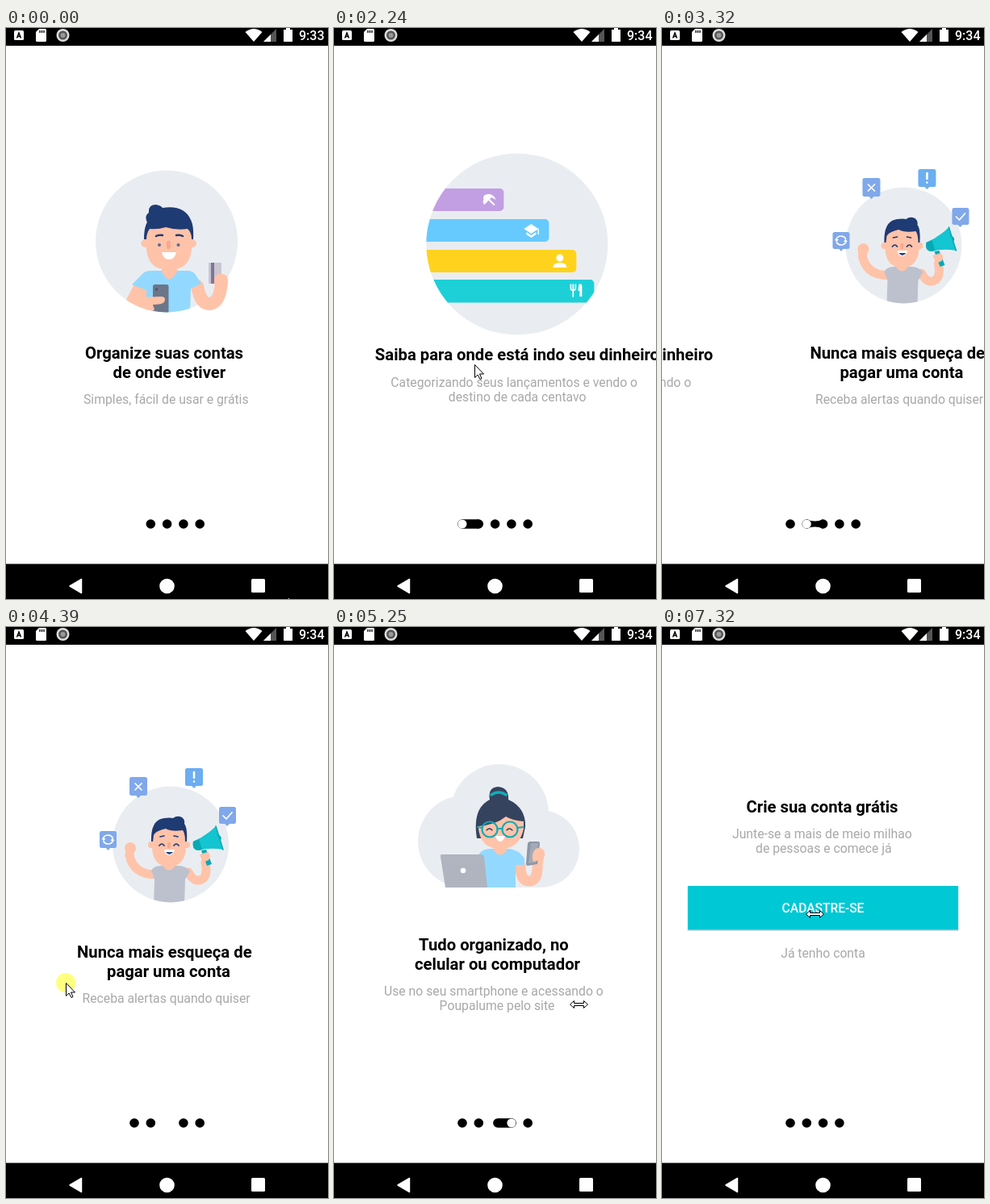
An HTML page that plays this animation: 399x708 px, repeating every 8000 ms.

```html
<!DOCTYPE html>
<html lang="pt-BR">
<head>
<meta charset="utf-8">
<title>Onboarding</title>
<style>
  html, body { margin: 0; width: 100%; height: 100%; overflow: hidden; background: #fff; }
  svg { display: block; width: 399px; height: 708px; }
  text { font-family: Roboto, sans-serif; }
  .title { font-size: 20.25px; font-weight: 700; fill: #000; }
  .sub { font-size: 15.75px; fill: #a8a8a8; }
  .label { font-size: 15.6px; font-weight: 500; fill: #fff; }
  .skin { fill: #ffc3a9; }
  .arm { fill: none; stroke: #ffc3a9; stroke-linecap: round; stroke-linejoin: round; }
  .pale { fill: #e9edf2; }
  .navy { fill: #1f3b73; }
  .shirt { fill: #93d9ff; }
  .line { fill: none; stroke-linecap: round; stroke-linejoin: round; }
</style>
</head>
<body>
<svg viewBox="0 0 399 708">
  <defs>
    <clipPath id="disc0"><path d="M100 150H300V264.500H287A88 88 0 0 1 111 264.500H100Z"/></clipPath>
    <clipPath id="disc1"><circle cx="200.500" cy="268" r="112.500"/></clipPath>
    <clipPath id="disc2"><path d="M100 150H300V269.500H276A72 72 0 0 1 132 269.500H100Z"/></clipPath>
  </defs>

  <!-- boy with card -->
  <g class="page">
    <circle class="pale" cx="199" cy="264.500" r="88"/>
    <path class="arm" stroke-width="16" d="M237 320Q241 342 252 342Q265 341 267 315"/>
    <g clip-path="url(#disc0)">
      <path class="skin" d="M160 316L174 320 176 333 196 334Q199 342 194 348L176 354H140Z"/>
      <path class="shirt" d="M170 304Q173 301 180 301H224Q232 301 235 306L242 317 229 323 228 356H174V325L156 318Z"/>
      <path class="skin" d="M193 292H212V302Q202 321 193 302Z"/>
      <rect x="182" y="318" width="19.500" height="40" rx="2.500" fill="#6c7689"/>
      <circle cx="186.500" cy="324" r="1.800" fill="#4b556b"/>
      <path class="skin" d="M146 340L164 334 193 333Q199 334 196 340Q193 343 182 343L184 349 176 356H140Z"/>
    </g>
    <rect x="251" y="291" width="16" height="26" fill="#c9c6d2"/>
    <rect x="254" y="291" width="4" height="26" fill="#81749c"/>
    <rect class="skin" x="258" y="305" width="17" height="17" rx="7"/>
    <circle class="skin" cx="172.500" cy="267" r="5"/><circle class="skin" cx="231" cy="267" r="5"/>
    <path class="skin" d="M174 238H230V274Q228 300 202 300Q176 300 174 274Z"/>
    <path class="navy" d="M171 262Q171 247 175 241Q171 233 177 229Q176 219 186 219Q192 220 194 223Q221 219 229 238Q233 246 232 262H230Q230 253 225 249Q211 251 198 247Q188 250 178 249Q174 254 174 262Z"/>
    <path class="line" stroke="#1f3b73" stroke-width="2.500" d="M186 258Q189 256 194 257M211 257Q216 256 219 258"/>
    <circle cx="190" cy="269" r="2" fill="#556d96"/><circle cx="213.500" cy="269" r="2" fill="#556d96"/>
    <path d="M199 265Q202 262 204 265V272Q201 277 199 272Z" fill="#f7a98f"/>
    <path d="M193 278H211Q209 287 202 287Q195 287 193 278Z" fill="#fff"/>
    <text class="title" x="98" y="410">Organize suas contas</text>
    <text class="title" x="132.500" y="434">de onde estiver</text>
    <text class="sub" x="96" y="466">Simples, fácil de usar e grátis</text>
  </g>

  <!-- category bars -->
  <g class="page">
    <circle class="pale" cx="200.500" cy="268" r="112.500"/>
    <g clip-path="url(#disc1)">
      <rect x="60" y="199" width="124" height="28" rx="5" fill="#c29ee3"/>
      <rect x="60" y="237" width="180" height="28" rx="5" fill="#66caff"/>
      <rect x="60" y="275" width="214" height="28" rx="5" fill="#ffd31d"/>
      <rect x="60" y="312" width="236" height="28.500" rx="5" fill="#1dd0d8"/>
    </g>
    <g fill="#fff">
      <path d="M159 213Q157 205 167 206Q173 208 174 213L169 210 160 219Q157 216 159 213Z"/>
      <path class="line" stroke="#fff" stroke-width="2" d="M165 212L172 219"/>
      <path d="M218 243L227 249 218 255 209 249ZM212 253L218 257 224 253V256L218 260 212 256ZM226 249H227.500V256H226Z"/>
      <circle cx="253.500" cy="285" r="4.500"/><path d="M245 297Q245 291 253.500 291Q262 291 262 297Z"/>
      <path d="M277 318Q281 316 281 320V333H278V326H276Z"/>
    </g>
    <path class="line" stroke="#fff" stroke-width="1.700" d="M267 318V323Q267 325 270 325Q273 325 273 323V318M270 318V333"/>
    <text class="title" x="24.500" y="412">Saiba para onde está indo seu dinheiro</text>
    <text class="sub" x="44" y="444.500">Categorizando seus lançamentos e vendo o</text>
    <text class="sub" x="115.500" y="463">destino de cada centavo</text>
  </g>

  <!-- boy with megaphone -->
  <g class="page">
    <circle class="pale" cx="204" cy="269.500" r="72"/>
    <g clip-path="url(#disc2)">
      <path class="arm" stroke-width="11" d="M186 307Q158 307 153 283L154 274M226 304Q234 319 244 312Q250 307 247 292"/>
      <path d="M180 302Q183 296 192 296H214Q223 296 228 303L222 313 221 345H183L184 313Z" fill="#bdc1cd"/>
    </g>
    <circle class="skin" cx="154" cy="274" r="7"/>
    <path class="skin" d="M195 290H209V297Q202 306 195 297Z"/>
    <circle class="skin" cx="180" cy="270" r="4"/><circle class="skin" cx="224" cy="270" r="4"/>
    <path class="skin" d="M181 249H223V275Q221 297 202 297Q183 297 181 275Z"/>
    <path class="navy" d="M180 266Q179 239 196 237Q203 236 207 237Q212 233 218 236Q222 239 221 244Q225 249 224 266H222Q222 256 219 252Q205 254 198 250Q185 253 183 258L182 266Z"/>
    <path class="line" stroke="#1f3b73" stroke-width="1.700" d="M191 260L196 259M208 259L213 260M190 271Q193 267 196 271M208 271Q211 267 214 271"/>
    <path d="M200 267H204V273Q202 276 200 273Z" fill="#f7a98f"/>
    <path d="M196 276H209Q207 283 202 283Q197 283 196 276Z" fill="#fff"/>
    <path d="M198 279H207Q202 285 198 279Z" fill="#234178"/>
    <path d="M232 266Q248 259 260 247L269 276Q253 273 238 277Q230 276 232 266Z" fill="#13c5d0"/>
    <path d="M232 266L239 263 243 276 238 277Q230 276 232 266M242 277L248 276 255 294 249 296Z" fill="#08a9b5"/>
    <path class="line" stroke="#08a9b5" stroke-width="1.500" d="M260 247L269 276M262 258Q268 260 265 265"/>
    <path class="skin" d="M240 282L250 279Q255 283 251 289L244 292Z"/>
    <g fill="#80a8ea">
      <path d="M118.500 253H134.500Q137 253 137 255.500V271.500Q137 274 134.500 274H129L126.500 277 124 274H118.500Q116 274 116 271.500V255.500Q116 253 118.500 253Z"/>
      <path d="M155.500 186H172.500Q175 186 175 188.500V206.500Q175 209 172.500 209H167L164 212 161 209H155.500Q153 209 153 206.500V188.500Q153 186 155.500 186Z"/>
      <path d="M224.500 175H241.500Q244 175 244 177.500V194.500Q244 197 241.500 197H236L233 200 230 197H224.500Q222 197 222 194.500V177.500Q222 175 224.500 175Z" fill="#6caef0"/>
      <path d="M266.500 223H282.500Q285 223 285 225.500V241.500Q285 244 282.500 244H277L274 247 271 244H266.500Q264 244 264 241.500V225.500Q264 223 266.500 223Z"/>
    </g>
    <path class="line" stroke="#fff" stroke-width="1.700" d="M160 194L168 202M168 194L160 202M269 234L273 238 280 230M120.500 262Q122 258 126.500 258Q130 258 132 261M132.500 265Q131 269 126.500 269Q123 269 121 266"/>
    <path d="M118.500 262H123.500L121 265.500ZM129.500 265H134.500L132 261.500Z" fill="#fff"/>
    <path class="line" stroke="#fff" stroke-width="2.600" d="M233 180V187M233 191.500V191.600"/>
    <text class="title" x="88" y="410">Nunca mais esqueça de</text>
    <text class="title" x="125" y="434">pagar uma conta</text>
    <text class="sub" x="94.500" y="466">Receba alertas quando quiser</text>
  </g>

  <!-- girl with laptop -->
  <g class="page">
    <g class="pale">
      <circle cx="161" cy="266" r="57"/><circle cx="205" cy="231" r="61"/>
      <circle cx="256" cy="275" r="48"/><rect x="161" y="250" width="95" height="73"/>
    </g>
    <path d="M177 262Q171 225 193 214Q190 199 203 198Q217 199 216 214Q238 224 237 248L234 262Z" fill="#36435f"/>
    <path class="line" stroke="#12aeb7" stroke-width="3.500" d="M195 208Q204 202 213 208"/>
    <path class="arm" stroke-width="13" d="M231 296Q231 315 242 315Q253 315 252 294L254 283"/>
    <path class="shirt" d="M180 281Q184 275 194 275H217Q229 276 236 287V295H225V323H180Z"/>
    <path class="skin" d="M198 263H214V277Q206 288 198 277Z"/>
    <path class="skin" d="M179 247Q201 245 213 235Q221 240 235 241V250Q230 275 206 275Q182 275 179 250Z"/>
    <g class="line" stroke="#13aab4" stroke-width="2.200">
      <circle cx="193" cy="251" r="9.500"/><circle cx="218" cy="251" r="9.500"/>
      <path d="M202.500 250H208.500M178 248L184 249M227 249L235 248"/>
    </g>
    <path class="line" stroke="#35425e" stroke-width="1.300" d="M189 252Q193 248 196 252M214 252Q217 248 221 252"/>
    <path d="M200 259H212Q210 266 206 266Q202 266 200 259Z" fill="#fff"/>
    <path d="M134 282H182Q185 282 186 285L190 323H138L132 285Q131 282 134 282Z" fill="#afb4bf"/>
    <circle cx="160" cy="302" r="3.300" fill="#fff"/>
    <path d="M242 266H253Q255 266 255 269L252 294 240 296Q238 296 238 293L240 268Z" fill="#8d96a6"/>
    <path d="M244 268H253L250 292 241 293Z" fill="#a3aab7"/>
    <path class="skin" d="M248 277Q252 272 258 275Q264 280 259 288L247 291Q244 284 248 277Z"/>
    <text class="title" x="105" y="400.500">Tudo organizado, no</text>
    <text class="title" x="100" y="424.500">celular ou computador</text>
    <text class="sub" x="62" y="456.500">Use no seu smartphone e acessando o</text>
    <text class="sub" x="202" y="475" text-anchor="middle">Poupalume pelo site</text>
  </g>

  <!-- sign up -->
  <g class="page">
    <text class="title" x="104.500" y="230">Crie sua conta grátis</text>
    <text class="sub" x="87" y="262">Junte-se a mais de meio milhao</text>
    <text class="sub" x="116" y="280">de pessoas e comece já</text>
    <rect x="31.500" y="322" width="336" height="55" fill="#dcdcdc"/>
    <rect x="32" y="321" width="335" height="54.500" fill="#00c8d5"/>
    <text class="label" x="199.500" y="354" text-anchor="middle">CADASTRE-SE</text>
    <text class="sub" x="199.500" y="410" text-anchor="middle">Já tenho conta</text>
  </g>

  <g id="dots"></g>

  <!-- status and navigation bars -->
  <path d="M0 0H399V22H0ZM0 664.500H399V708H0Z"/>
  <g fill="#fff">
    <rect x="10" y="3" width="12" height="12" rx="1.500"/>
    <path d="M13.500 12.500L16 6 18.500 12.500M14.500 10.500H17.500" fill="none" stroke="#000" stroke-width="1.500"/>
    <path d="M41 1H48.500Q50 1 50 2.500V15.500Q50 17 48.500 17H38.500Q37 17 37 15.500V5Z"/>
    <path d="M42 3V6M44.500 3V6M47 3V6" stroke="#000" stroke-width="1.300"/>
    <circle cx="70.500" cy="9" r="8" fill="#ddd"/><circle cx="70.500" cy="9" r="5.500" fill="#555"/><circle cx="70.500" cy="9" r="3" fill="#999"/>
    <path d="M296.500 5Q307-3 317.500 5L307 17Z"/>
    <path d="M335 1V17H319Z" fill="#555"/><path d="M328 8V17H319Z"/>
    <path d="M344 2H347V0H352V2H355V17H344Z"/>
    <text id="clock" x="363" y="14.500" font-size="16" font-weight="500"></text>
    <path d="M79 692L93.500 683.500V700.500Z" stroke="#fff" stroke-width="1.500" stroke-linejoin="round"/>
    <circle cx="199.500" cy="692" r="9.300"/><rect x="304" y="683" width="17" height="17" rx="1.500"/>
  </g>

  <g id="cursor">
    <circle id="press" r="12" fill="#ffff00" fill-opacity=".5"/>
    <path id="arrow" d="M.5.500V16.500L4 13 7 18.500 9 17.500 6.500 12H11.500Z" fill="#fff" stroke="#000"/>
    <path id="resize" d="M-9.500 4L-4.500-.500V2.500H7.500V-.500L12.500 4 7.500 8.500V5.500H-4.500V8.500Z" fill="#fff" stroke="#000"/>
  </g>
</svg>
<script>
const LOOP = 8000, STEP = 77, PAGE_GAP = 409;
const DOT_X = 159, DOT_GAP = 20.3, DOT_Y = 615, DOT_R = 5.8;

const swipes = [
  { start: 1971, length: 528 },
  { start: 3200, length: 364 },
  { start: 4430, length: 500 },
  { start: 5900, length: 350, dragAt: 5770, drag: 0.086 },
];

// time, x, y of the pointer tip
const track = [
  [0, 349, 705], [50, 349, 705], [300, 296, 615], [450, 296, 615], [690, 253, 528],
  [830, 253, 528], [924, 252, 515], [1060, 252, 515], [1386, 335, 418], [1600, 335, 418],
  [1925, 43, 421], [2010, 43, 421], [2233, 174, 417], [2541, 385, 430], [3003, 340, 440],
  [3200, 340, 440], [3300, -40, 440], [3400, -40, 440], [3773, 330, 440], [4081, 330, 440],
  [4389, 74, 441], [4480, 42, 441], [4900, 42, 455], [5236, 302, 464], [5600, 315, 450],
  [5750, 315, 450], [5929, 240, 430], [6083, 87, 397], [6780, 87, 397], [7030, 188, 352], [LOOP, 188, 352],
];
const pressed = [[1610, 1850], [3200, 3300], [4081, 4440], [5750, 6060]];
const resizing = [[5160, 5550], [7238, LOOP]];

const $ = id => document.getElementById(id);
const pages = document.querySelectorAll('.page');
const clamp = v => Math.min(1, Math.max(0, v));
const within = (t, spans) => spans.some(([a, b]) => t >= a && t < b);
const show = (el, on) => el.setAttribute('visibility', on ? 'visible' : 'hidden');
const move = (el, x, y) => el.setAttribute('transform', `translate(${x} ${y})`);

function swipeProgress(s, t) {
  const base = t >= s.dragAt ? s.drag : 0;
  return base + (1 - base) * (1 - (1 - clamp((t - s.start) / s.length)) ** 4);
}

const circle = (x, r, fill = '#000') => `<circle cx="${x}" cy="${DOT_Y}" r="${r}" fill="${fill}"/>`;

// Two dots flow together, the white dot crosses over, then the ink withdraws behind it.
function drawDots(t) {
  const x = i => DOT_X + DOT_GAP * i, r = DOT_R;
  let selected = 0, active = -1, join = 0, cross = 0, retreat = 0;
  swipes.forEach((s, i) => {
    const p = swipeProgress(s, t), end = s.start + s.length;
    if (!p) return;
    retreat = clamp((t - end - 270) / 220);
    selected = i + 1;
    active = retreat < 1 ? i : -1;
    join = clamp((p - 0.5) * 2.3);
    cross = clamp((t - end) / 150);
  });
  let out = '';
  for (let i = 0; i < 5; i++) {
    if (active < 0 && i === selected) continue;
    const radius = i === active && retreat ? r * clamp(retreat * 2 - 1) : r;
    out += circle(x(i), radius);
  }
  if (active >= 0) {
    const a = x(active), b = x(active + 1), mid = (a + b) / 2;
    if (retreat) {
      const left = a - r + DOT_GAP * retreat;
      out += `<rect x="${left}" y="${DOT_Y - r}" width="${b + r - left}" height="${2 * r}" rx="${r}"/>`;
    } else if (join) {
      const bend = r * (1 - 2 * join);
      out += `<path d="M${a} ${DOT_Y - r}Q${mid} ${DOT_Y + bend} ${b} ${DOT_Y - r}V${DOT_Y + r}Q${mid} ${DOT_Y - bend} ${a} ${DOT_Y + r}Z"/>`;
    }
    out += circle(a + DOT_GAP * cross, 5.5, '#fff');
  }
  $('dots').innerHTML = out;
}

function drawCursor(t) {
  const i = track.findIndex(k => k[0] > t);
  const [t0, x0, y0] = track[i - 1], [t1, x1, y1] = track[i];
  const f = (t - t0) / (t1 - t0);
  const wide = within(t, resizing);
  move($('cursor'), Math.round(x0 + (x1 - x0) * f), Math.round(y0 + (y1 - y0) * f));
  show($('press'), within(t, pressed));
  show($('arrow'), !wide);
  show($('resize'), wide);
}

function frame(now) {
  const t = Math.floor((now % LOOP) / STEP) * STEP;
  const position = swipes.reduce((sum, s) => sum + swipeProgress(s, t), 0);
  pages.forEach((page, i) => move(page, (i - position) * PAGE_GAP, 0));
  drawDots(t);
  drawCursor(t);
  $('clock').textContent = t < 1232 ? '9:33' : '9:34';
}

let origin;
function tick(now) {
  origin ??= now;
  frame(now - origin);
  requestAnimationFrame(tick);
}
frame(0);
requestAnimationFrame(tick);
</script>
</body>
</html>
```
